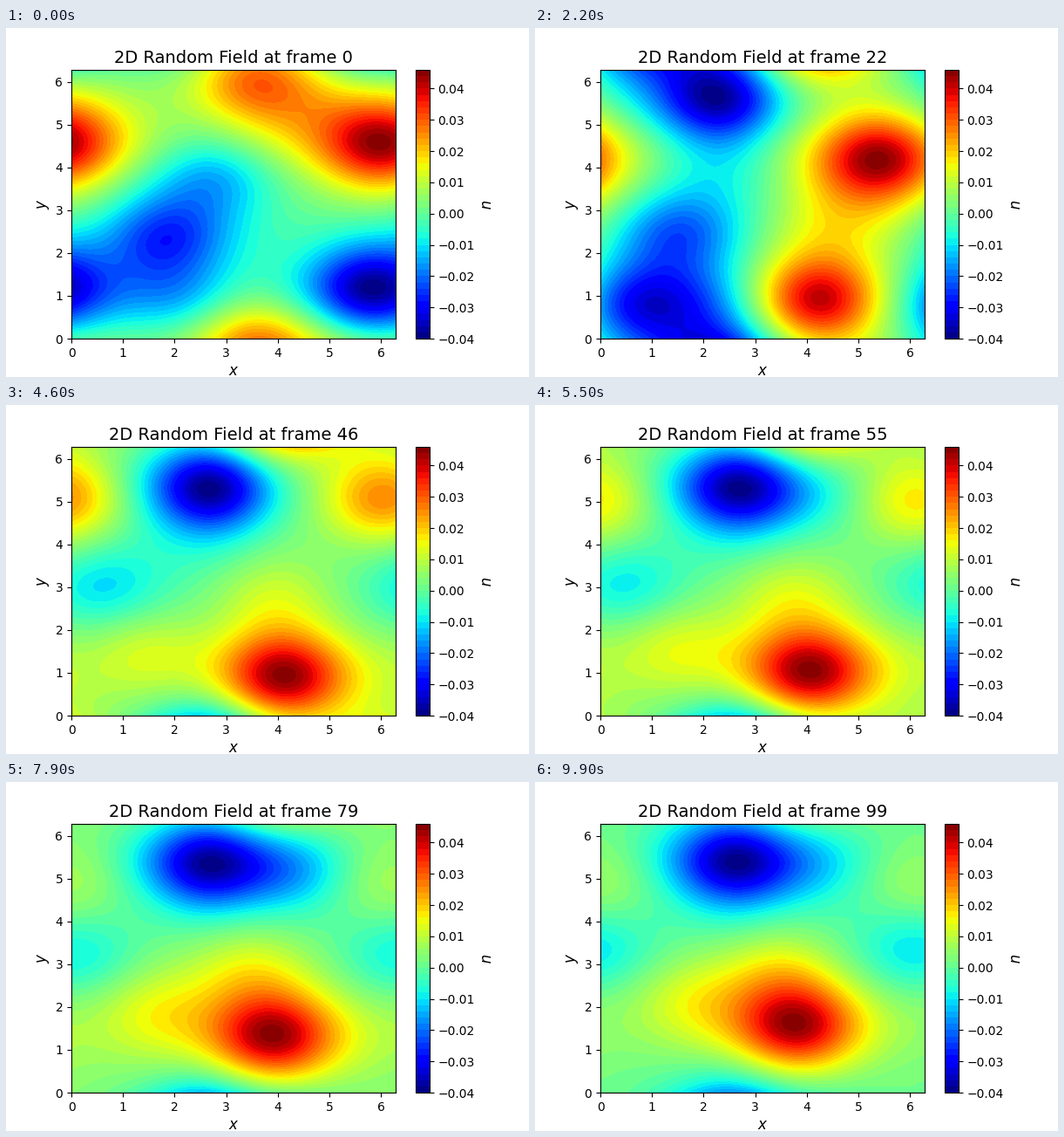
Write a matplotlib script that moves like this. It is 600x400 px and loops after 10 s.

```python
import numpy as np
import matplotlib.pyplot as plt
from matplotlib.animation import FuncAnimation

FRAMES, INTERVAL = 100, 100
TAU = 2 * np.pi
U_MIN, U_MAX = -0.0396, 0.0454
LEVELS = np.arange(-20, 24) * 0.002
WIDTH, HEIGHT = 0.9, 0.75

axis = np.linspace(0, TAU, 80)
X, Y = np.meshgrid(axis, axis)


def bump(x, y):
    """Gaussian-like hill that wraps around the square."""
    return np.exp((np.cos(X - x) - 1) / WIDTH**2
                  + (np.cos(Y - y) - 1) / HEIGHT**2)


def vortex(*keys):
    """Hill that drifts and changes strength between (time, x, y, strength)."""
    times, *tracks = zip(*keys)

    def at(frame):
        x, y, strength = (np.interp(frame, times, track) for track in tracks)
        return strength * bump(x, y)
    return at


main_cold = vortex((0, 2.2, 5.8, 0), (22, 2.3, 5.6, -.95),
                   (31, 2.7, 5.3, -1), (99, 2.6, 5.4, -.95))
cold_arm = vortex((46, 4.2, 5.1, 0), (70, 4.3, 5.1, -.45),
                  (99, 4.2, 5.3, -.2))
main_hot = vortex((0, 3.5, -.15, .6), (22, 4.2, .9, 1),
                  (46, 4.1, .9, 1), (99, 3.8, 1.55, 1))
side_hot = vortex((0, 6.0, 4.55, 1), (22, 5.4, 4.2, 1), (31, 6.1, 4.5, .9),
                  (46, 6.1, 5.1, .65), (65, 6.2, 5.0, .27))
early_cold = vortex((0, 5.8, 1.15, -1), (22, 7.0, .8, -.75), (31, 7.2, .8, 0))
cool_band = vortex((0, 1.8, 2.4, -.6), (22, 1.5, 2.5, -.55),
                   (31, 2.0, 3.3, -.25), (46, .6, 3.0, -.32),
                   (99, -.2, 3.3, -.32))
cool_tip = vortex((0, 2.8, 3.8, -.42), (40, 2.3, 3.9, 0))
warm_patch = vortex((22, 2.1, .9, -.3), (31, 1.4, 1.45, .5),
                    (46, 1.4, 1.5, .25), (99, 1.8, 2.2, .25))
warm_ridge = vortex((0, 4.4, 5.4, .2), (22, 4.5, 2.7, .2), (65, 3.4, 2.9, .25))

vortices = [main_cold, cold_arm, main_hot, side_hot, early_cold,
            cool_band, cool_tip, warm_patch, warm_ridge]


def surface(frame):
    z = sum(v(frame) for v in vortices)
    return U_MIN + (z - z.min()) * (U_MAX - U_MIN) / np.ptp(z)


def draw(frame):
    for old in list(ax.collections):
        old.remove()
    filled = ax.contourf(X, Y, surface(frame), levels=LEVELS, cmap="jet")
    ax.set_title(f"2D Random Field at frame {frame}", fontsize=14)
    return filled


fig, ax = plt.subplots(figsize=(6, 4), dpi=100)
bar = fig.colorbar(draw(0), ax=ax)
bar.set_label("$u$", fontsize=12, rotation=270, labelpad=15)
ax.set(xlim=(0, TAU), ylim=(0, TAU))
ax.set_xlabel("$x$", fontsize=12, labelpad=3)
ax.set_ylabel("$y$", fontsize=12, labelpad=3)


def update(frame):
    return [draw(frame)]


anim = FuncAnimation(fig, update, frames=FRAMES, interval=INTERVAL,
                     init_func=lambda: [], repeat=True, repeat_delay=0)
plt.show()
```
